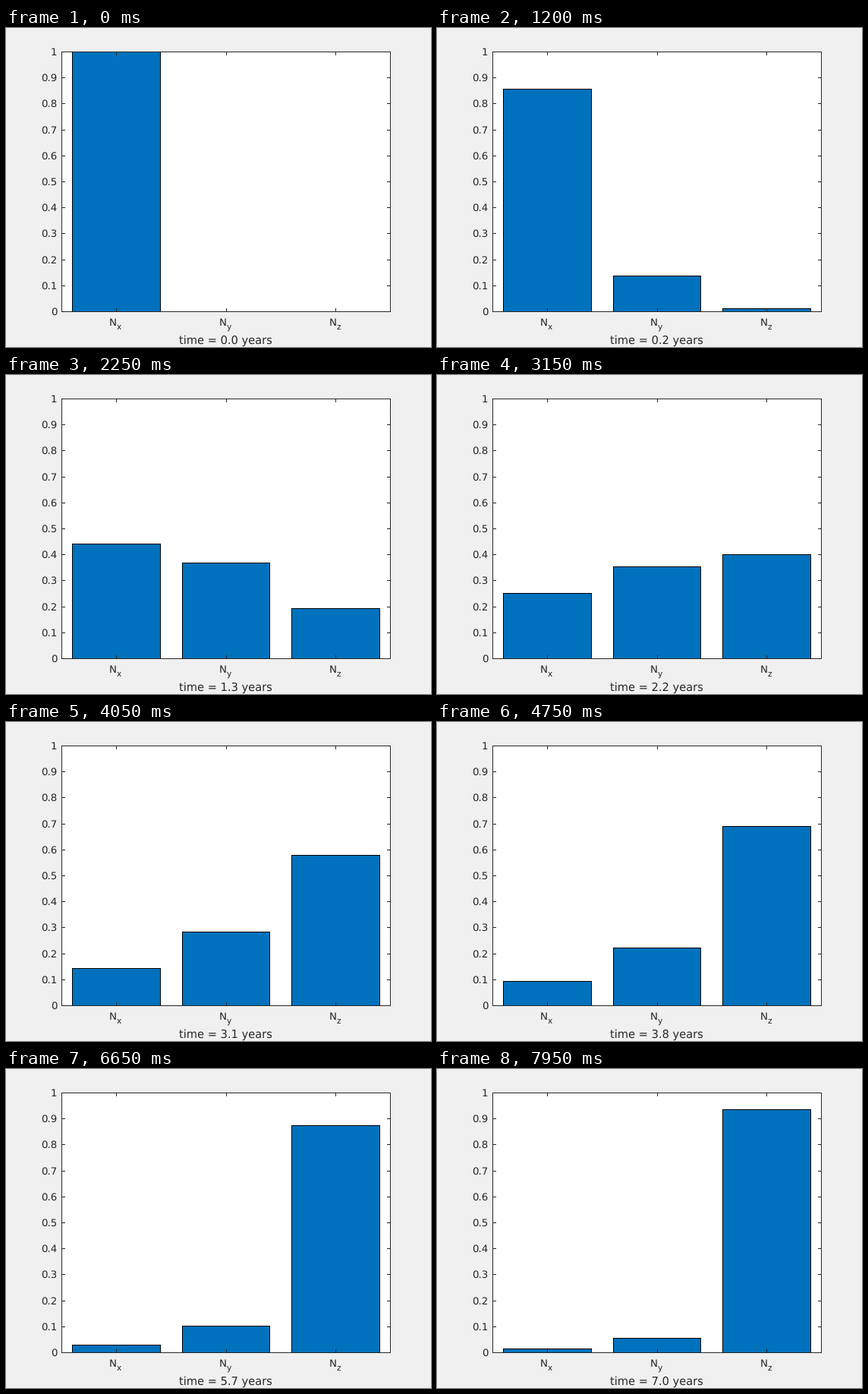
A matplotlib script for the animation above (8 s loop, 560 by 420 pixels).

```python
import math

import matplotlib.pyplot as plt
from matplotlib.animation import FuncAnimation
from matplotlib.patches import Rectangle

WIDTH, HEIGHT, DPI = 560, 420, 100
LEFT, RIGHT, TOP, BOTTOM = 73, 506, 31, 373
INK, BLUE, PAPER = "#262626", "#0072BD", "#F0F0F0"
FRAMES, INTERVAL, HOLD = 160, 50, 19
STEP_YEARS = 0.05
DECAY = 0.03107  # share of x and of y that decays in one step
TICK = 4

plt.rcParams.update({
    "font.family": "DejaVu Sans",
    "text.hinting": "none",
    "toolbar": "None",
})

fig = plt.figure(figsize=(WIDTH / DPI, HEIGHT / DPI), dpi=DPI, facecolor=PAPER)
ax = fig.add_axes([0, 0, 1, 1])
ax.set_xlim(0, WIDTH)
ax.set_ylim(HEIGHT, 0)
ax.axis("off")


def block(x0, y0, x1, y1, color, zorder=1):
    """Fill whole pixels, both corners included."""
    patch = Rectangle((x0, y0), x1 - x0 + 1, y1 - y0 + 1, facecolor=color,
                      linewidth=0, antialiased=False, zorder=zorder)
    return ax.add_patch(patch)


def label(x, baseline, text, pixels):
    return ax.text(x, baseline, text, fontsize=pixels * 72 / DPI, color=INK,
                   ha="left", va="baseline", zorder=5)


def populations(n):
    """Forward Euler solution of the chain x -> y -> z with equal rates."""
    keep = 1 - DECAY
    x = keep ** n
    y = n * DECAY * keep ** (n - 1) if n else 0.0
    return x, y, 1 - x - y


block(LEFT, TOP, RIGHT, BOTTOM, "white", 0)

# Bars: a black block with a blue one inset by the outline
unit = (RIGHT - LEFT) / 3
bars = []
for i in range(3):
    x0 = round(LEFT + unit * (i + 0.1))
    x1 = round(LEFT + unit * (i + 0.9))
    bars.append((block(x0, BOTTOM, x1, BOTTOM, "black", 2),
                 block(x0 + 1, BOTTOM, x1 - 1, BOTTOM, BLUE, 3)))

# Axes box
for y in (TOP, BOTTOM):
    block(LEFT, y, RIGHT, y, INK, 4)
for x in (LEFT, RIGHT):
    block(x, TOP, x, BOTTOM, INK, 4)

# Vertical scale
for i in range(11):
    y = round(BOTTOM - (BOTTOM - TOP) * i / 10)
    block(LEFT, y, LEFT + TICK, y, INK, 4)
    block(RIGHT - TICK, y, RIGHT, y, INK, 4)
    label(59 if i in (0, 10) else 46, y + 5, f"{i / 10:g}", 40 / 3)

# Categories
for x, start, name in ((145, 136, "x"), (290, 281, "y"), (434, 426, "z")):
    block(x, TOP, x, TOP + TICK, INK, 4)
    block(x, BOTTOM - TICK, x, BOTTOM, INK, 4)
    label(start, 392, "N", 40 / 3)
    label(start + 10, 397, name, 32 / 3)

clock = label(228, 416, "", 44 / 3)


def update(frame):
    n = max(0, frame - HOLD)
    for (edge, fill), value in zip(bars, populations(n)):
        top = math.floor(BOTTOM - (BOTTOM - TOP) * max(value, 0) + 1e-9)
        edge.set_y(top)
        edge.set_height(BOTTOM - top + 1)
        fill.set_y(top + 1)
        fill.set_height(max(0, BOTTOM - top - 1))
    clock.set_text(f"time = {n * STEP_YEARS:.1f} years")
    return [part for bar in bars for part in bar] + [clock]


anim = FuncAnimation(fig, update, frames=FRAMES, interval=INTERVAL,
                     init_func=lambda: update(0), repeat=True, repeat_delay=0)
plt.show()
```
